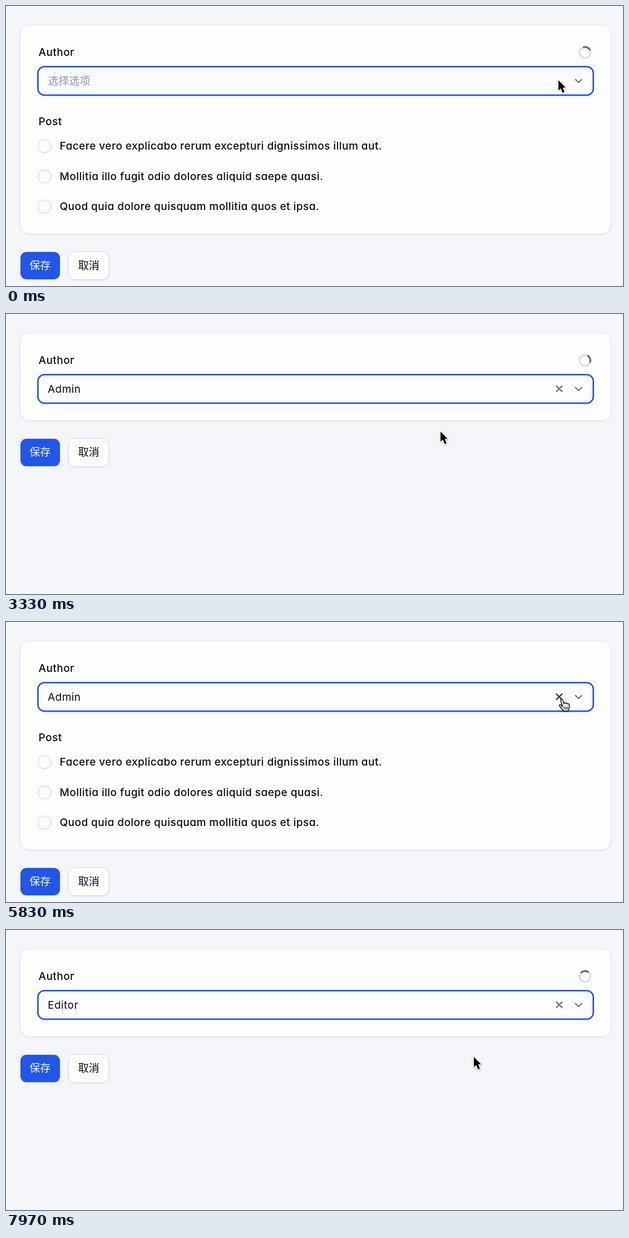
An HTML page that plays this animation: 1109x505 px, repeating every 8000 ms.

```html
<!DOCTYPE html>
<html lang="zh">
<head>
<meta charset="utf-8">
<style>
html, body { margin: 0; width: 100%; height: 100%; overflow: hidden; background: #f5f6fa; }
svg { display: block; }
text { font: 19px Inter, "Noto Sans CJK SC", "Noto Sans CJK", sans-serif; letter-spacing: .46px; font-feature-settings: "cv11"; fill: #0a0b18; }
.medium { font-weight: 500; }
.cjk { font-family: "Noto Sans CJK SC", "Noto Sans CJK", sans-serif; letter-spacing: 0; }
.soft { filter: drop-shadow(0 1px 1px rgba(0,0,0,.07)); }
.list { filter: drop-shadow(0 9px 9px rgba(20,25,40,.11)) drop-shadow(0 2px 3px rgba(20,25,40,.08)); }
.pointer { filter: drop-shadow(0 1.5px 1.5px rgba(0,0,0,.3)); }
.line { fill: none; stroke-linecap: round; stroke-linejoin: round; }
</style>
</head>
<body>
<svg width="1109" height="505" viewBox="0 0 1109 505">
  <rect width="1109" height="505" fill="#f5f6fa"/>
  <rect id="card" class="soft" x="25.5" y="34" width="1062" height="377" rx="17" fill="#fdfdfd" stroke="#e4e5e9"/>
  <text class="medium" x="58.5" y="89.5">Author</text>
  <g id="spinner" class="line" stroke-width="3.3">
    <circle r="9.8" stroke="#dcdee2"/>
    <path d="M-9.8 0A9.8 9.8 0 0 1 0 -9.8" stroke="#626c7e" stroke-linecap="butt"/>
  </g>
  <rect x="57.4" y="109.3" width="998.2" height="51.6" rx="12" fill="#fdfdfd" stroke="#2156e4" stroke-width="2.7"/>
  <text id="hint" class="cjk" x="75.5" y="141.5" style="fill:#8d96ab">选择选项</text>
  <text id="value" x="75" y="141.5"></text>
  <path id="clear" d="M988.8 129.3l11 11m0-11l-11 11" stroke-width="2.5" fill="none"/>
  <path class="line" d="M1023.5 132.5l5.7 5.6 5.7-5.6" stroke="#6a7182" stroke-width="2.1"/>
  <g id="posts">
    <text class="medium" x="58.5" y="215">Post</text>
  </g>
  <g id="buttons">
    <rect class="soft" x="26" y="443.5" width="71" height="49.5" rx="11" fill="#2156e8"/>
    <text class="medium cjk" x="42.3" y="474.8" style="fill:#fff">保存</text>
    <rect class="soft" x="112.5" y="443" width="72.5" height="50.5" rx="11" fill="#fdfdfd" stroke="#d6d8dd"/>
    <text class="medium cjk" x="129.8" y="474.8">取消</text>
  </g>
  <g id="menu">
    <rect class="list" x="59" y="170.5" width="995.5" height="109.5" rx="11" fill="#fdfdfd"/>
    <rect id="active" x="64" y="176" width="985" height="49" rx="6" fill="#f5f6fa"/>
    <text x="75" y="207">Admin</text>
    <text x="75" y="256">Editor</text>
  </g>
  <g id="cursor">
    <path id="arrow" class="pointer" d="M0 0V18.3L4.1 14.5L7.5 22.6L11 21.1L7.6 13.2H13Z" fill="#000" stroke="#fff" stroke-width="2.4" stroke-linejoin="round" paint-order="stroke"/>
    <g id="hand" class="pointer line" stroke="#000" stroke-width="1.4" transform="translate(-5 3)">
      <path fill="#fff" d="M7.6 14.6L4.3 4.4C3.5 1.2 6.5 0 7.6 2.9L9.9 9.2C10.2 7 12.8 7 13.2 9.1C13.8 7.6 16 8 16.3 9.9C17.4 8.8 19.2 9.6 19.3 11.7V16C19.2 18.5 17.6 19.5 17.4 22.4H8.9C8.5 20 5.4 18 3.4 15C.2 11.8 1.8 10.2 4.4 11.7Z"/>
      <path d="M10.3 15v4.3M13.1 15v4.3M15.8 15v4.3" stroke-width="1.2"/>
    </g>
  </g>
</svg>
<script>
const $ = id => document.getElementById(id);
const show = (id, on) => $(id).setAttribute('visibility', on ? 'visible' : 'hidden');
const move = (id, x, y, turn = 0) => $(id).setAttribute('transform', `translate(${x} ${y}) rotate(${turn})`);

$('posts').innerHTML += [
  'Facere vero explicabo rerum excepturi dignissimos illum aut.',
  'Mollitia illo fugit odio dolores aliquid saepe quasi.',
  'Quod quia dolore quisquam mollitia quos et ipsa.'
].map((label, i) => {
  const y = 252.7 + i * 54.6;
  return `<circle cx="69.5" cy="${y}" r="11.8" fill="#fdfdfd" stroke="#d9dade" stroke-width="1.3"/>
    <text class="medium" x="96.5" y="${y + 6.3}">${label}</text>`;
}).join('');

// Pointer stops: time, x, y
const path = [
  [0, 993, 134], [970, 993, 134], [1500, 930, 228], [1930, 930, 228],
  [2280, 965, 143], [2370, 963, 144], [2730, 781, 212], [4830, 781, 212],
  [5030, 891, 212], [5630, 998, 135], [6770, 998, 135], [6960, 975, 142],
  [7570, 841, 229], [8000, 841, 229]
];
// Loading periods: start, end
const loads = [[-190, 400], [3010, 4400], [6270, 6500], [7860, 8000]];

function slope(i, k) {
  const a = path[i - 1], p = path[i], b = path[i + 1];
  if (!a || !b || a[k] === p[k] || b[k] === p[k]) return 0;
  return (b[k] - a[k]) / (b[0] - a[0]);
}

// Smooth curve through the stops, at rest wherever the pointer pauses
function pointer(t) {
  const i = path.findIndex((p, n) => n && t < p[0]) - 1;
  const a = path[i], b = path[i + 1], d = b[0] - a[0], u = (t - a[0]) / d;
  return [1, 2].map(k =>
    a[k] + (b[k] - a[k]) * u * u * (3 - 2 * u) +
    d * u * (1 - u) * (slope(i, k) * (1 - u) - slope(i + 1, k) * u));
}

function draw() {
  const t = performance.now() % 8000;
  const tall = t < 400 || (t >= 4400 && t < 6500);
  const value = t < 2920 ? '' : t < 6270 ? 'Admin' : t < 7690 ? '' : 'Editor';
  const open = (t >= 2350 && t < 2920) || (t >= 6930 && t < 7690);
  const load = loads.find(([start, end]) => t >= start && t < end);
  const [x, y] = pointer(t);
  const hover = value && Math.abs(x - 994) < 9 && Math.abs(y - 135) < 10;

  $('card').setAttribute('height', tall ? 377 : 158.5);
  move('buttons', 0, tall ? 0 : -218.4);
  show('posts', tall);

  $('value').textContent = value;
  show('hint', !value);
  show('clear', value);
  $('clear').setAttribute('stroke', hover ? '#3b3b3b' : '#757575');

  show('menu', open);
  $('active').setAttribute('y', y > 225 ? 225 : 176);
  show('active', open);

  show('spinner', load);
  if (load) move('spinner', 1040.7, 83.8, (t - load[0]) * .36);

  move('cursor', x, y);
  show('arrow', !hover);
  show('hand', hover);
  requestAnimationFrame(draw);
}
draw();
</script>
</body>
</html>
```
